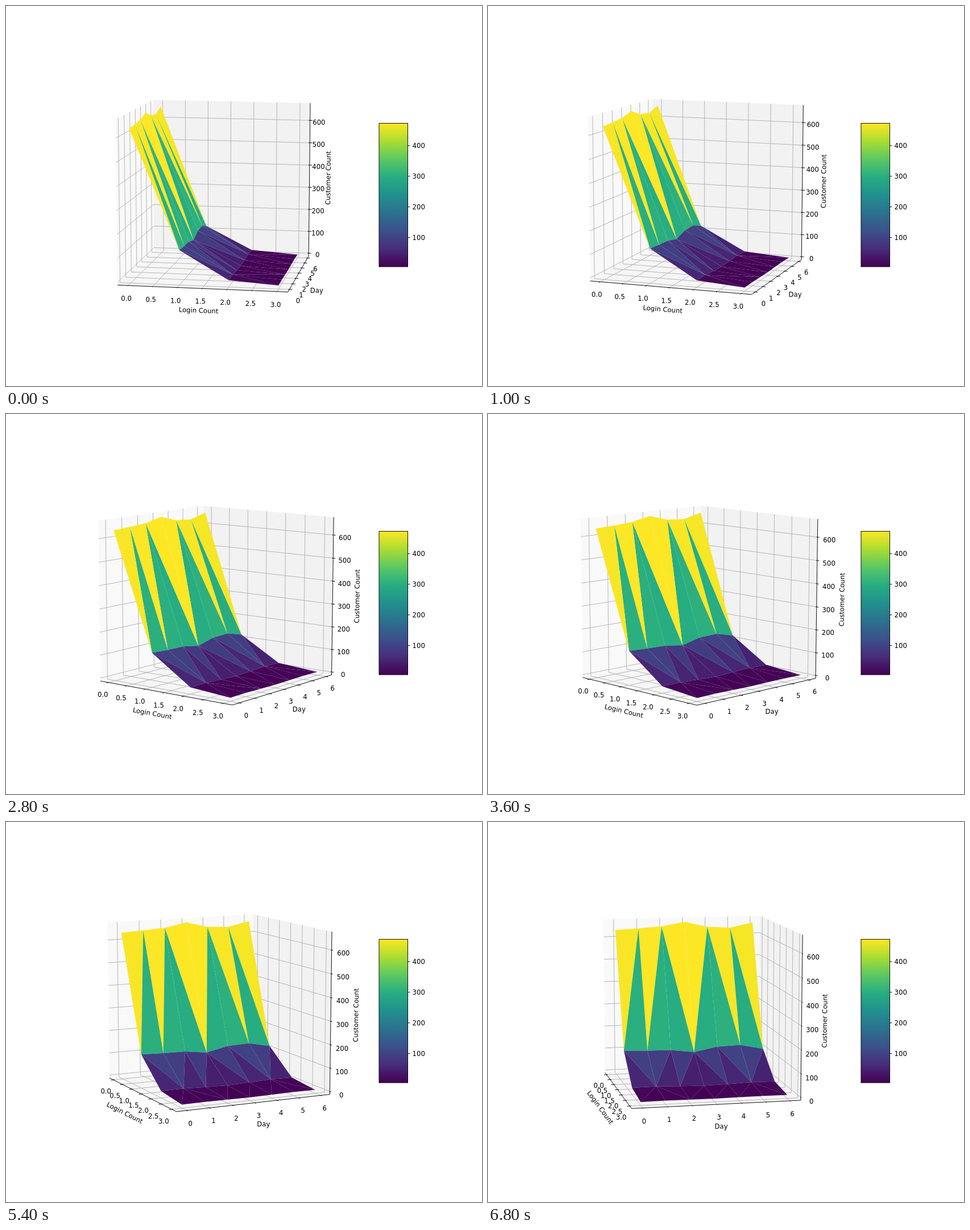
Animation, 837 px wide and 669 px high, one loop 7000 ms. Source, as an HTML page with a canvas:

```html
<!DOCTYPE html>
<html lang="en">
<head>
<meta charset="utf-8">
<title>Login surface</title>
<style>
  html, body { margin: 0; width: 100%; height: 100%; overflow: hidden; background: #fff; }
  canvas { display: block; }
</style>
</head>
<body>
<canvas id="stage" width="837" height="669"></canvas>
<script>
const ctx = document.getElementById('stage').getContext('2d');
const FONT = 11.63, LINE = 0.93;
const DIST = 10, ELEV = 10 * Math.PI / 180;
const SCALE_X = 2805, SCALE_Y = 2730, MID_X = 371.1, MID_Y = 325.9;
const Z_MIN = 1, Z_MAX = 663, C_MIN = 4.5, C_MAX = 473;
const EDGE = 0.5 + 1 / 48, DELTA = 1 / 12;
const TICK_PAD = 0.0522, LABEL_PAD = 0.1136;

// Customer count by login count (rows) and day (columns)
const counts = [
  [634, 639, 645, 663, 638, 632, 653],
  [135, 131, 129, 116, 136, 139, 118],
  [16, 17, 13, 10, 13, 17, 15],
  [2, 3, 2, 1, 2, 3, 2]
];
// Walk along each strip: u steps on the upper row, l on the lower
const strips = ['ululluullulu', 'luululluluul', 'ulluululullu'];

const viridis = [
  [68, 1, 84], [71, 44, 122], [59, 81, 139], [44, 113, 142], [33, 144, 141],
  [39, 173, 129], [92, 200, 99], [170, 220, 50], [253, 231, 37]
];

const normX = v => (v + 0.15) / 3.3 - 0.5;
const normY = v => (v + 0.3) / 6.6 - 0.5;
const normZ = v => (v - Z_MIN) / (Z_MAX - Z_MIN) - 0.5;
const range = (n, step = 1) => Array.from({ length: n }, (_, i) => i * step);

// Back corner where the three walls meet
const corner = [-EDGE, EDGE, -EDGE];
const axes = [
  { dir: 0, flip: 1, tickDir: 1, ticks: range(7, 0.5), norm: normX, digits: 1, name: 'Login Count', turn: true },
  { dir: 1, flip: 0, tickDir: 0, ticks: range(7), norm: normY, digits: 0, name: 'Day' },
  { dir: 2, flip: 0, tickDir: 0, ticks: range(7, 100), norm: normZ, digits: 0, name: 'Customer Count', turn: true }
];
const walls = [[0, '#f9f9f9'], [1, '#f2f2f2'], [2, '#f6f6f6']];

function color(value) {
  const t = Math.min(1, Math.max(0, (value - C_MIN) / (C_MAX - C_MIN))) * 8;
  const i = Math.min(7, Math.floor(t));
  const mix = viridis[i].map((c, k) => Math.round(c + (viridis[i + 1][k] - c) * (t - i)));
  return `rgb(${mix})`;
}

function buildFaces() {
  const faces = [];
  const add = (...pts) => faces.push({
    pts: pts.map(([r, d]) => [normX(r), normY(d), normZ(counts[r][d])]),
    fill: color(pts.reduce((sum, [r, d]) => sum + counts[r][d], 0) / 3)
  });
  strips.forEach((walk, r) => {
    let u = 0, l = 0;
    for (const step of walk) {
      if (step === 'u') add([r, u], [r, ++u], [r + 1, l]);
      else add([r + 1, l], [r + 1, ++l], [r, u]);
    }
  });
  return faces;
}
const faces = buildFaces();

function camera(azim) {
  const ca = Math.cos(azim), sa = Math.sin(azim);
  const ce = Math.cos(ELEV), se = Math.sin(ELEV);
  return ([x, y, z]) => {
    const toward = x * ca + y * sa;
    const depth = DIST - toward * ce - z * se;
    return [
      MID_X + SCALE_X * (y * ca - x * sa) / depth,
      MID_Y - SCALE_Y * (z * ce - toward * se) / depth,
      depth
    ];
  };
}

const withCoord = (p, i, v) => p.map((c, k) => k === i ? v : c);
const flipped = (p, i) => withCoord(p, i, -p[i]);
// Push a point away from the box centre, except along one axis
const pushOut = (p, dir, by) => p.map((c, k) => k === dir ? c : c + (c < 0 ? -by : by));

function trace(pts) {
  ctx.beginPath();
  pts.forEach(([x, y]) => ctx.lineTo(x, y));
}
function line(pts, stroke) {
  trace(pts);
  ctx.strokeStyle = stroke;
  ctx.lineWidth = LINE;
  ctx.stroke();
}
function fill(pts, style) {
  trace(pts);
  ctx.fillStyle = style;
  ctx.fill();
}
function text(str, x, y, align = 'center', angle = 0) {
  ctx.save();
  ctx.translate(x, y);
  ctx.rotate(angle);
  ctx.font = `${FONT}px "DejaVu Sans", sans-serif`;
  ctx.textAlign = align;
  ctx.fillStyle = '#000';
  ctx.fillText(str, 0, FONT * 0.276);
  ctx.restore();
}

function drawAxis(axis, project) {
  const { dir, flip, tickDir } = axis;
  const start = flipped(corner, flip), end = flipped(start, dir);
  const ends = [start, end].map(project);
  line(ends, '#000');

  const mid = project(pushOut(withCoord(start, dir, 0), dir, LABEL_PAD));
  let angle = 0;
  if (axis.turn) {
    angle = Math.atan2(ends[1][1] - ends[0][1], ends[1][0] - ends[0][0]);
    if (angle > Math.PI / 2) angle -= Math.PI;
    if (angle < -Math.PI / 2) angle += Math.PI;
  }
  text(axis.name, mid[0], mid[1], 'center', angle);

  const spots = axis.ticks.map(v => axis.norm(v));
  for (const s of spots) {
    const base = withCoord(corner, dir, s);
    line([flipped(base, (dir + 1) % 3), base, flipped(base, (dir + 2) % 3)].map(project), '#b0b0b0');
  }
  spots.forEach((s, i) => {
    const base = withCoord(start, dir, s);
    const side = Math.sign(base[tickDir]) * DELTA;
    const at = f => project(withCoord(base, tickDir, base[tickDir] + f * side));
    line([at(-0.1), at(0.2)], '#000');
    const [x, y] = project(pushOut(base, dir, TICK_PAD));
    text(axis.ticks[i].toFixed(axis.digits), x, y + 5.8);
  });
}

function drawColorbar() {
  const x = 656, top = 206.5, w = 50.5, h = 252.5;
  const grad = ctx.createLinearGradient(0, top + h, 0, top);
  viridis.forEach((c, i) => grad.addColorStop(i / 8, `rgb(${c})`));
  ctx.fillStyle = grad;
  ctx.fillRect(x, top, w, h);
  ctx.strokeStyle = '#000';
  ctx.lineWidth = LINE;
  ctx.strokeRect(x, top, w, h);
  for (const v of [100, 200, 300, 400]) {
    const y = top + h * (C_MAX - v) / (C_MAX - C_MIN);
    line([[x + w, y], [x + w + 4, y]], '#000');
    text(String(v), x + w + 8.1, y + 1, 'left');
  }
}

function draw(step) {
  const project = camera((2 * step - 80) * Math.PI / 180);
  ctx.fillStyle = '#fff';
  ctx.fillRect(0, 0, 837, 669);

  for (const [i, shade] of walls) {
    const a = (i + 1) % 3, b = (i + 2) % 3, p = flipped(corner, a);
    fill([corner, p, flipped(p, b), flipped(corner, b)].map(project), shade);
  }
  axes.forEach(axis => drawAxis(axis, project));

  faces
    .map(f => {
      const pts = f.pts.map(project);
      return { pts, fill: f.fill, depth: pts[0][2] + pts[1][2] + pts[2][2] };
    })
    .sort((a, b) => b.depth - a.depth)
    .forEach(f => fill(f.pts, f.fill));

  drawColorbar();
}

const began = performance.now();
let shown = -1;
function tick() {
  const step = Math.floor((performance.now() - began) / 200) % 35;
  if (step !== shown) draw(shown = step);
  requestAnimationFrame(tick);
}
tick();
</script>
</body>
</html>
```
